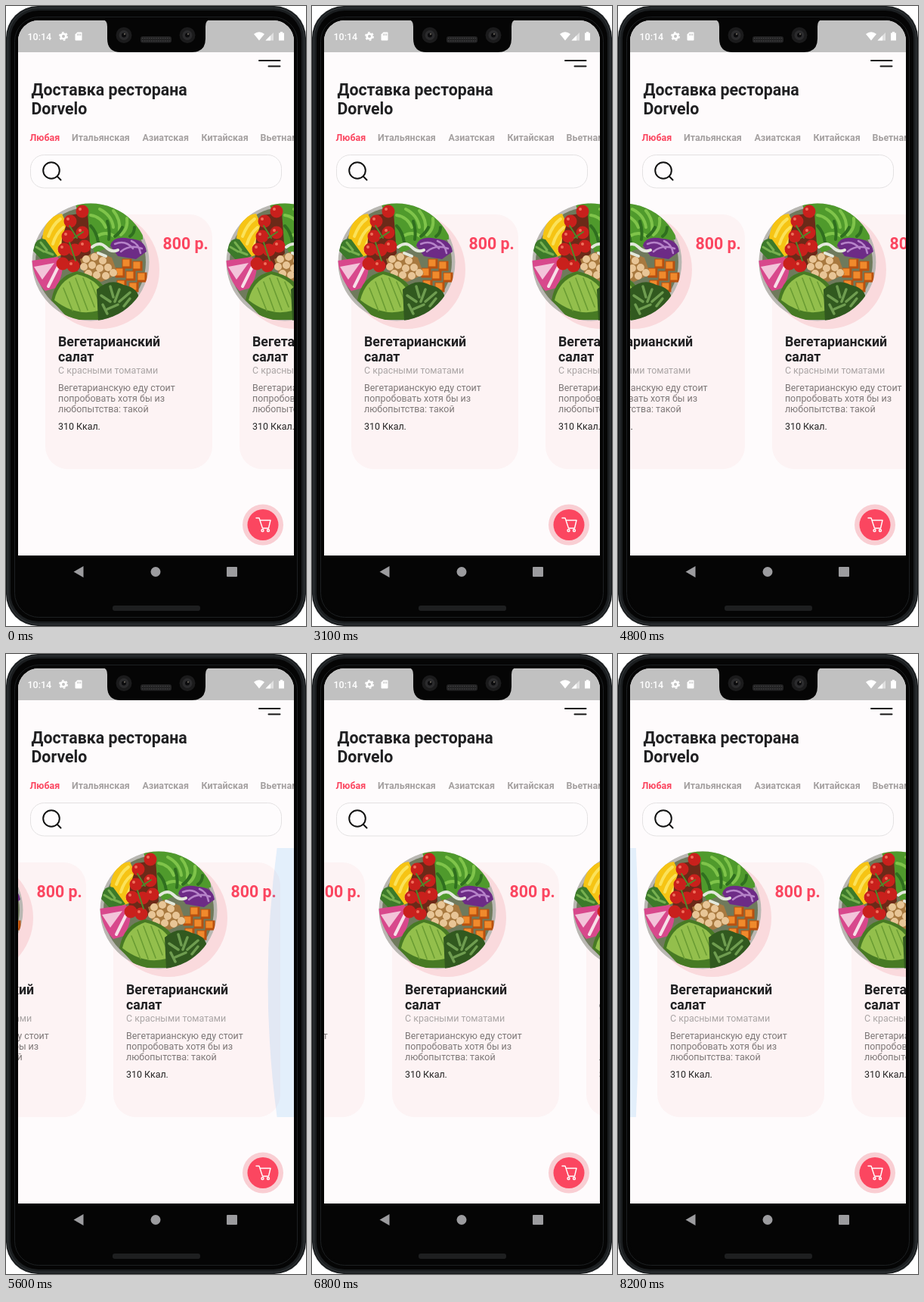
Recreate the animation shown at these times as an HTML page. Size 397x818 px, loop 8.8 s.

```html
<!DOCTYPE html>
<html lang="ru">
<head>
<meta charset="utf-8">
<title>Доставка</title>
<style>
  html, body { margin: 0; width: 100%; height: 100%; overflow: hidden; background: #fff; }
  svg { display: block; width: 397px; height: 818px; }
  text { font: 400 12.44px Roboto, sans-serif; }
  .h1 { font-size: 21.32px; font-weight: 700; fill: #202022; }
  .h2 { font-size: 17.76px; font-weight: 700; fill: #202022; }
  .tab { font-weight: 700; fill: #a5a1a1; }
  .tab.on, .price { fill: #fb4660; }
  .price { font-size: 21.32px; font-weight: 700; }
  .sub { fill: #aaa5a5; }
  .body { fill: #7d7777; }
  .kcal { fill: #252525; }
  .clock { font-weight: 500; fill: #fff; }
  .line { fill: none; stroke-linecap: round; stroke-linejoin: round; }
  .glow { fill: #2196f3; opacity: .12; }
</style>
</head>
<body>
<svg viewBox="0 0 397 818">
  <defs>
    <clipPath id="screen"><rect x="16" y="19" width="365" height="784" rx="27"/></clipPath>
    <clipPath id="plate"><circle cx="112" cy="338" r="77.5"/></clipPath>

    <g id="salad" clip-path="url(#plate)">
      <circle cx="112" cy="338" r="78" fill="#b9b7b2"/>
      <circle cx="112" cy="338" r="73" fill="#6f7a5c"/>
      <path d="M92 262Q130 254 160 272Q182 288 181 308L150 312L118 326L104 300Z" fill="#4f9a2c"/>
      <g class="line" stroke-width="4">
        <path d="M112 276q14 2 20 16M124 268q16 8 18 24M142 270q10 12 8 26M160 280q2 14-8 22M120 304q12-8 24 0" stroke="#7fc44a"/>
        <path d="M112 290q8 8 10 22M134 284q4 12 2 24M154 292q-4 8-10 12M170 292q0 8-6 12" stroke="#2f6f1f"/>
      </g>
      <path d="M48 306Q52 276 74 274L82 292L80 326L64 332Z" fill="#f6c414"/>
      <path d="M56 304q6-16 16-23M62 314q4-14 14-22M70 322q2-10 8-18" class="line" stroke="#fbe25a" stroke-width="4"/>
      <path d="M35 322Q40 304 52 308L68 330L50 338Z" fill="#3c7a2a"/>
      <path d="M40 318l10 6M46 312l8 10M52 324l10 4" class="line" stroke="#77b04f" stroke-width="3"/>
      <path d="M34 336L68 331Q82 344 66 372L52 376Q38 362 34 336Z" fill="#d8488c"/>
      <path d="M37 344l27-5-16 22Z" fill="#f3c4da"/>
      <path d="M72 338l-16 32" class="line" stroke="#f7dfe8" stroke-width="4"/>
      <path d="M84 276L108 272L112 326L94 350L72 340L74 306Z" fill="#6b2a18"/>
      <path d="M101 271h0M85 284h0M101 299h0M82 304h0M77 321h0M91 322h0M104 317h0M75 340h0M89 343h0" class="line" stroke="#c9201c" stroke-width="17"/>
      <path d="M98 268h0M82 281h0M98 296h0M79 301h0M74 318h0M101 314h0M86 340h0" class="line" stroke="#f0705c" stroke-width="4"/>
      <path d="M84 290l10 16M90 306l12-8M84 312l8 24" class="line" stroke="#4f8a2c" stroke-width="2"/>
      <path d="M138 316Q142 302 164 307Q184 308 186 324L172 334L148 330Z" fill="#6d2b86"/>
      <path d="M144 314q14-6 24 6M152 324q12-10 28-4M166 310q10 4 12 16" class="line" stroke="#b683c9" stroke-width="2.5"/>
      <path d="M160 340h0M174 343h0M151 352h0M165 356h0M180 358h0M153 368h0M169 371h0" fill="none" stroke="#b9500f" stroke-width="13" stroke-linecap="square"/>
      <path d="M159 339h0M173 342h0M150 351h0M164 355h0M179 357h0M152 367h0M168 370h0" fill="none" stroke="#f08a2c" stroke-width="9" stroke-linecap="square"/>
      <path d="M98 334L120 324L140 332L148 354L126 364L104 354Z" fill="#a8793f"/>
      <path d="M106 334h0M117 331h0M128 336h0M103 344h0M114 342h0M124 346h0M135 345h0M109 353h0M120 355h0M132 356h0M142 352h0" class="line" stroke="#e8c596" stroke-width="10"/>
      <path d="M114 318q10-8 18 0t16 4M122 326l10 4" class="line" stroke="#e3e8dc" stroke-width="4"/>
      <path d="M60 388Q66 356 94 350Q124 356 134 378L128 414H84Z" fill="#477a24"/>
      <path d="M64 388Q70 362 94 354Q120 360 129 380L122 402Q92 410 64 388Z" fill="#93bf4c"/>
      <path d="M76 372l12 30M84 364l14 38M92 359l16 42M102 359l15 38M112 364l11 26" class="line" stroke="#6a9c33" stroke-width="1.6"/>
      <path d="M120 374Q138 358 156 368Q176 372 176 388L146 416H122Z" fill="#31591f"/>
      <path d="M126 382l12 8M138 370l4 14M150 374l-6 16M164 378l-14 12M134 400l14-6M156 396l8-10M128 394l6 12" class="line" stroke="#6f9d50" stroke-width="3.5"/>
    </g>

    <g id="card">
      <rect x="52" y="275" width="221" height="336" rx="30" fill="#fdf3f4"/>
      <circle cx="125" cy="348" r="78" fill="#fadadd"/>
      <use href="#salad"/>
      <text class="price" x="207.5" y="321">800 р.</text>
      <text class="h2" x="69" y="449">Вегетарианский</text>
      <text class="h2" x="69" y="469">салат</text>
      <text class="sub" x="69" y="485">С красными томатами</text>
      <text class="body" x="69" y="508">Вегетарианскую еду стоит</text>
      <text class="body" x="69" y="522">попробовать хотя бы из</text>
      <text class="body" x="69" y="536">любопытства: такой</text>
      <text class="kcal" x="69" y="559">310 Ккал.</text>
    </g>
    <path id="arc" d="M0 256H.65Q1.35 433.5 .65 611H0Z"/>
  </defs>

  <!-- phone body -->
  <rect width="397" height="818" rx="42" fill="#1b1e20"/>
  <rect x="2.5" y="2.5" width="392" height="813" rx="40" fill="none" stroke="#34383b"/>
  <rect x="6" y="6" width="385" height="806" rx="37" fill="#050505"/>
  <rect x="11.5" y="14.5" width="374" height="792" rx="32" fill="none" stroke="#1d2022"/>

  <g clip-path="url(#screen)">
    <rect x="16" y="19" width="365" height="706" fill="#fefbfc"/>
    <rect x="16" y="19" width="365" height="42" fill="#c1c1c1"/>

    <path d="M335 72H362.500M347.500 79.500H362.500" class="line" stroke="#151515" stroke-width="2"/>
    <text class="h1" x="33.500" y="118">Доставка ресторана</text>
    <text class="h1" x="33.500" y="143">Dorvelo</text>

    <g id="tabs">
      <text class="tab on" x="31.500" y="178">Любая</text>
      <text class="tab" x="87" y="178">Итальянская</text>
      <text class="tab" x="180.500" y="178">Азиатская</text>
      <text class="tab" x="258.500" y="178">Китайская</text>
      <text class="tab" x="336.500" y="178">Вьетнамская</text>
      <text class="tab" x="431" y="178">Французская</text>
      <text class="tab" x="526" y="178">Немецкая</text>
    </g>

    <rect x="32.500" y="196.500" width="332" height="43.500" rx="18" fill="#fefcfd" stroke="#e3e1e2"/>
    <path d="M68 225L72.500 229.500" class="line" stroke="#111" stroke-width="2"/>
    <circle cx="60" cy="217" r="10.800" fill="none" stroke="#111" stroke-width="2"/>

    <g id="cards">
      <use href="#card"/>
      <use href="#card" x="257"/>
      <use href="#card" x="514"/>
      <use href="#card" x="771"/>
    </g>
    <use id="glowL" class="glow" href="#arc"/>
    <use id="glowR" class="glow" href="#arc"/>

    <!-- cart button -->
    <circle cx="340" cy="684.500" r="27" fill="#f9ced3"/>
    <circle cx="340" cy="684.500" r="20.500" fill="#fb4660"/>
    <g class="line" stroke="#fff" stroke-width="1.400">
      <path d="M331 675.500h4l4.500 13.500h8l2.500-10.500h-13.500"/>
      <circle cx="339.500" cy="692" r="1.500"/>
      <circle cx="347" cy="692" r="1.500"/>
    </g>

    <!-- status bar -->
    <text class="clock" x="28.500" y="44.500">10:14</text>
    <g fill="#fff">
      <circle cx="76" cy="40" r="3.300" fill="none" stroke="#fff" stroke-width="2.600"/>
      <circle cx="76" cy="40" r="5.200" fill="none" stroke="#fff" stroke-width="1.600" stroke-dasharray="2.700 2.745"/>
      <path d="M94.500 34.500H99.500Q100.500 34.500 100.500 35.500V44.500Q100.500 45.500 99.500 45.500H92.500Q91.500 45.500 91.500 44.500V37.500Z"/>
      <path d="M94.700 36.500v2.500M96.700 36.500v2.500M98.700 36.500v2.500" stroke="#c1c1c1"/>
      <path d="M328 37Q335 31.500 342 37L335 45.500Z"/>
      <path d="M354 35V45.500H343.500Z" opacity=".5"/>
      <path d="M350 39V45.500H343.500Z"/>
      <path d="M361 35.500h2v-1.500h3v1.500h2v10h-7Z"/>
    </g>

    <!-- navigation bar -->
    <rect x="16" y="725" width="365" height="80" fill="#050505"/>
    <g fill="#9c9c9f">
      <path d="M89.500 746.500L102.500 739V754Z"/>
      <circle cx="198" cy="746.500" r="6.500"/>
      <rect x="292" y="740" width="14" height="13" rx="1"/>
    </g>
  </g>

  <!-- notch and speakers -->
  <path d="M127 18Q134 18 134 27V43Q134 61 152 61H246Q264 61 264 43V27Q264 18 271 18Z" fill="#050505"/>
  <g id="lens">
    <circle cx="156" cy="38.500" r="10.500" fill="#1b1b1c"/>
    <circle cx="156" cy="38.500" r="6.500" fill="#2b2b2d"/>
    <circle cx="156" cy="38.500" r="3" fill="#0b0b0d"/>
    <circle cx="157" cy="37" r="1.200" fill="#5e5a52"/>
  </g>
  <use href="#lens" x="84"/>
  <rect x="178" y="40" width="41" height="8.500" rx="3" fill="#232324"/>
  <path d="M180 42.500H217M180 46H217" stroke="#454547" stroke-dasharray="1.500 1.500"/>
  <rect x="141" y="791" width="116" height="7" rx="3" fill="#1e1f20"/>
</svg>
<script>
  const LOOP = 8800, STEP = 100;
  const linear = p => p;
  const easeOut = p => 1 - (1 - p) ** 3;

  // Keys are [ms, value] pairs
  const tabKeys = [[500, 0], [1100, 206], [2100, 206], [2600, 10], [2900, 10], [3100, 0]];
  const cardKeys = [[3800, 0], [4500, 472], [4600, 472], [5200, 681],
                    [5900, 681], [6800, 203], [7700, 0]];
  const rightKeys = [[5000, 0], [5200, 56], [5300, 56], [5800, 20], [5900, 20], [6000, 0]];
  const leftKeys = [[7500, 0], [7700, 44], [8200, 12]];

  function valueAt(keys, t, ease) {
    const i = keys.findIndex(k => k[0] > t);
    if (i === 0) return keys[0][1];
    if (i < 0) return keys[keys.length - 1][1];
    const [t0, a] = keys[i - 1], [t1, b] = keys[i];
    return a + (b - a) * ease((t - t0) / (t1 - t0));
  }

  const place = (id, transform) =>
    document.getElementById(id).setAttribute('transform', transform);

  function draw() {
    const t = Math.floor(performance.now() % LOOP / STEP) * STEP;
    place('tabs', `translate(${-valueAt(tabKeys, t, easeOut)})`);
    place('cards', `translate(${-valueAt(cardKeys, t, easeOut)})`);
    place('glowL', `translate(16) scale(${valueAt(leftKeys, t, linear)} 1)`);
    place('glowR', `translate(381) scale(${-valueAt(rightKeys, t, linear)} 1)`);
    requestAnimationFrame(draw);
  }
  draw();
</script>
</body>
</html>
```
